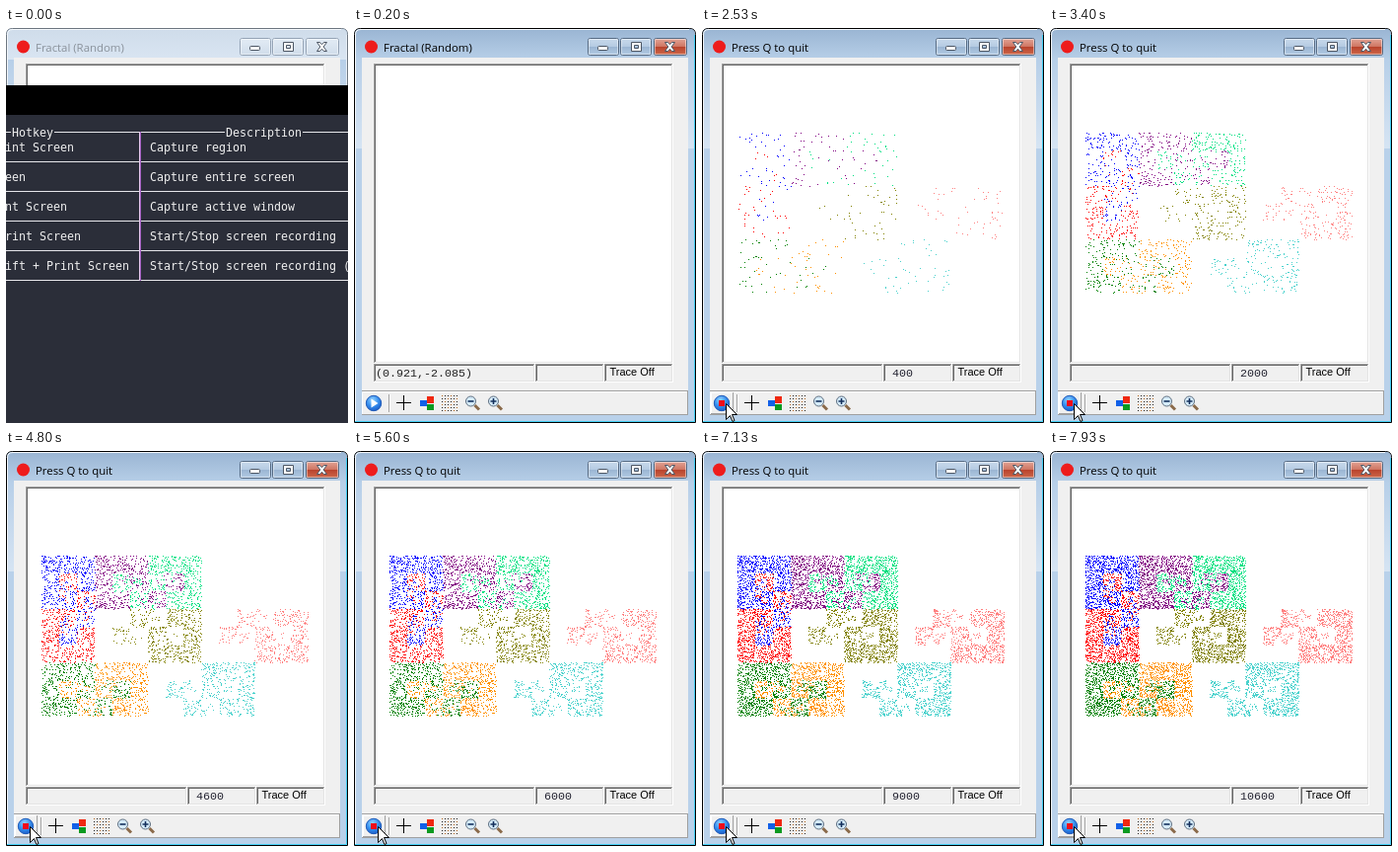
These frames come from a looping animation (347 by 400 pixels, 8000 ms). An HTML page with a canvas:

```html
<!DOCTYPE html>
<html lang="en">
<head>
<meta charset="utf-8">
<title>Random fractal</title>
<style>
html, body { margin: 0; width: 100%; height: 100%; overflow: hidden; background: #fff; }
svg, canvas { position: absolute; left: 0; top: 0; display: block; }
.title { font: 11.4px "Open Sans", "Noto Sans", sans-serif; }
.mono { font: 11.67px "Liberation Mono", monospace; }
.small { font: 11px "Liberation Sans", sans-serif; }
.term { font: 11.63px "DejaVu Sans Mono", monospace; fill: #f0f0f0; white-space: pre; }
.crisp { shape-rendering: crispEdges; }
</style>
</head>
<body>
<svg id="ui" width="347" height="400" viewBox="0 0 347 400">
  <defs>
    <linearGradient id="cap" x2="0" y2="1">
      <stop stop-color="#9ab5d3"/><stop offset="1" stop-color="#b7cfe8"/>
    </linearGradient>
    <linearGradient id="capOff" x2="0" y2="1">
      <stop stop-color="#cfdcea"/><stop offset="1" stop-color="#d9e5f2"/>
    </linearGradient>
    <linearGradient id="side" x2="0" y2="1">
      <stop stop-color="#b7cfe8"/><stop offset="1" stop-color="#d6e4f3"/>
    </linearGradient>
    <linearGradient id="btn" x2="0" y2="1">
      <stop stop-color="#c9daec"/><stop offset=".48" stop-color="#b5cbe2"/>
      <stop offset=".5" stop-color="#9ab5d2"/><stop offset="1" stop-color="#b3cbe4"/>
    </linearGradient>
    <linearGradient id="close" x2="0" y2="1">
      <stop stop-color="#e3a597"/><stop offset=".48" stop-color="#cf7663"/>
      <stop offset=".5" stop-color="#b9412b"/><stop offset="1" stop-color="#cd6a4c"/>
    </linearGradient>
    <linearGradient id="btnOff" x2="0" y2="1">
      <stop stop-color="#e3ecf5"/><stop offset="1" stop-color="#cfdcea"/>
    </linearGradient>
    <radialGradient id="ball" cx=".42" cy=".3" r=".75">
      <stop stop-color="#9ad6ff"/><stop offset=".5" stop-color="#3a92f0"/><stop offset="1" stop-color="#1456c4"/>
    </radialGradient>
  </defs>

  <!-- window frame -->
  <path id="frame" d="M.5 399.5V6.500Q.5.5 6.500.5H340.500Q346.500.5 346.500 6.500V399.500Z" fill="#b9d1ea"/>
  <path id="caption" d="M1 32V6.500Q1 1 6.500 1H340.500Q346 1 346 6.500V32Z" fill="url(#cap)"/>
  <rect x="1" y="32" width="345" height="90" fill="url(#side)"/>
  <path d="M1.500 398V7Q1.500 1.500 7 1.500H340" fill="none" stroke="#f4f8fc"/>
  <path id="glow" d="M1 398.500H345.500V7" fill="none"/>
  <circle cx="17.500" cy="19" r="6.500" fill="#ee1c1c"/>
  <text id="title" class="title" x="30" y="24"></text>
  <g id="buttons">
    <rect x="237.500" y="10.500" width="31" height="17" rx="2" fill="url(#btn)"/>
    <rect x="270.500" y="10.500" width="31" height="17" rx="2" fill="url(#btn)"/>
    <rect id="shut" x="304.500" y="10.500" width="33" height="17" rx="2" fill="url(#close)"/>
  </g>
  <path d="M238.500 11.500H267.500V26.500H238.500ZM271.500 11.500H300.500V26.500H271.500ZM305.500 11.500H336.500V26.500H305.500Z" fill="none" stroke="#fff" stroke-opacity=".45"/>
  <g fill="#fff" stroke="#4c5664">
    <rect x="247.500" y="18.500" width="10" height="4" rx="1"/>
    <path fill-rule="evenodd" d="M281.500 14.500H291.500V23.500H281.500ZM284.500 17.500V20.500H288.500V17.500Z"/>
    <path d="M315.500 14.500H318.500L320.500 16.700 322.500 14.500H325.500L322.200 19 325.500 23.500H322.500L320.500 21.200 318.500 23.500H315.500L318.800 19Z"/>
  </g>

  <!-- client area -->
  <g id="client" class="crisp">
    <rect x="8" y="30" width="331" height="362" fill="#f0f0f0"/>
    <rect x="20" y="36" width="304" height="304" fill="#fff"/>
    <path d="M8 367.500H339" stroke="#a0a0a0"/>
    <path d="M8.500 391V368.500H338" fill="none" stroke="#fff"/>
    <path d="M8 391.500H338.500V368" fill="none" stroke="#a0a0a0"/>
    <path d="M35.500 371V389" stroke="#a0a0a0"/>
    <path d="M36.500 371V389" stroke="#fff"/>
  </g>
  <text id="coords" class="mono" x="22" y="353" fill="#222"></text>
  <text id="count" class="mono" x="193" y="353" fill="#222230"></text>
  <text class="small" x="259.500" y="352">Trace Off</text>

  <!-- toolbar -->
  <g id="edge" class="crisp" fill="none">
    <path id="lit" d="M9.500 391V369.500H32" stroke="#fff"/>
    <path id="dim" d="M9 390.500H31.500V369" stroke="#a0a0a0"/>
  </g>
  <g id="run">
    <circle cx="20" cy="380" r="7.700" fill="url(#ball)" stroke="#1f5ab8"/>
    <path id="play" d="M17.500 375.500L24.500 380L17.500 384.500Z" fill="#fff"/>
    <rect id="stop" x="17" y="377" width="6" height="6" fill="#f00c18"/>
  </g>
  <g id="tools" class="crisp">
    <path d="M43 379.500H58M50.500 372V387" stroke="#000"/>
    <rect x="67" y="377" width="7" height="6" fill="#1260e8"/>
    <rect x="74" y="373" width="7" height="7" fill="#f02810"/>
    <rect x="74" y="381" width="7" height="6" fill="#0a9a20"/>
  </g>
  <g id="lenses" fill="#d5ebfa" stroke="#5f6f80"></g>
</svg>

<canvas id="plot" width="347" height="400"></canvas>

<svg id="top" width="347" height="400" viewBox="0 0 347 400">
  <path id="cursor" d="M.5.5V16.500L4.500 12.500L7 18.500L9 17.500L6.500 11.500H11.500Z" fill="#fff" stroke="#000"/>
  <g id="terminal">
    <rect y="58" width="347" height="30" fill="#000"/>
    <rect y="88" width="347" height="312" fill="#2b2e39"/>
    <path class="crisp" d="M0 105.500H5M49 105.500H222M301 105.500H347" stroke="#e6e6ea"/>
    <text class="term" x="6" y="110">Hotkey</text>
    <text class="term" x="223" y="110">Description</text>
  </g>
</svg>

<script>
const $ = id => document.getElementById(id);
const add = (parent, tag, attrs, text = "") => {
  const el = document.createElementNS("http://www.w3.org/2000/svg", tag);
  for (const name in attrs) el.setAttribute(name, attrs[name]);
  el.textContent = text;
  parent.append(el);
  return el;
};
const show = (id, on) => { $(id).style.display = on ? "" : "none"; };

// Two-pixel sunken borders: canvas and status panels
function sunken(x, y, w, h) {
  const line = (d, stroke) => add($("client"), "path", { d, stroke, fill: "none" });
  const r = x + w, b = y + h;
  line(`M${x} ${b - .5}H${r - .5}V${y}`, "#fff");
  line(`M${x + 1} ${b - 1.5}H${r - 1.5}V${y + 1}`, "#e3e3e3");
  line(`M${x + .5} ${b - 1}V${y + .5}H${r - 1}`, "#a0a0a0");
  line(`M${x + 1.5} ${b - 2}V${y + 1.5}H${r - 2}`, "#696969");
}
sunken(20, 36, 304, 304);
sunken(20, 340, 164, 19);
sunken(184, 340, 70, 19);
sunken(254, 340, 70, 19);

// Grid icon
for (let i = 0; i < 36; i++) {
  const col = i % 6, row = Math.floor(i / 6);
  add($("tools"), "rect", {
    x: 89 + col * 3, y: 372 + row * 3, width: 1, height: 1,
    fill: (col + row) % 3 ? "#222" : "#b5651d"
  });
}

// Magnifiers
for (const [x, sign] of [[118.5, "M-3 0H3"], [141.5, "M-3 0H3M0-3V3"]]) {
  const lens = add($("lenses"), "g", { transform: `translate(${x} 378)` });
  add(lens, "path", { d: "M4 4L8.500 8.500", stroke: "#8a6a4a", "stroke-width": 3 });
  add(lens, "circle", { r: 5 });
  add(lens, "path", { d: sign, stroke: "#14305c", "stroke-width": 1.6 });
}

// Terminal table
const rows = [
  [69, "+ Print Screen", "Capture region"],
  [20, "Print Screen", "Capture entire screen"],
  [62, "+ Print Screen", "Capture active window"],
  [76, "+ Print Screen", "Start/Stop screen recording"],
  [125, "Shift + Print Screen", "Start/Stop screen recording (GIF)"]
];
rows.forEach(([end, key, what], i) => {
  const y = 125 + i * 30, term = $("terminal");
  add(term, "text", { class: "term", x: end, y, "text-anchor": "end" }, key);
  add(term, "text", { class: "term", x: 146, y }, what);
  add(term, "path", { class: "crisp", d: `M0 ${y + 10.5}H347`, stroke: "#e6e6ea" });
});
add($("terminal"), "path", { class: "crisp", d: "M135.500 105V256", stroke: "#e6c8ee" });
add($("terminal"), "path", { class: "crisp", d: "M136.500 105V256", stroke: "#a35fc0" });

// Chaos game: colour, cell column and row, then a 2x2 orientation matrix
const maps = [
  ["#0000ff", 0, 0, 0, 1, 1, 0],
  ["#800080", 1, 0, 1, 0, 0, 1],
  ["#00e080", 2, 0, -1, 0, 0, 1],
  ["#ff0000", 0, 1, 0, 1, -1, 0],
  ["#808000", 2, 1, -1, 0, 0, -1],
  ["#ff8080", 4, 1, -1, 0, 0, -1],
  ["#008000", 0, 2, 1, 0, 0, 1],
  ["#ff9000", 1, 2, -1, 0, 0, 1],
  ["#48d1cc", 3, 2, -1, 0, 0, 1]
];
const CELL = 54.2, LEFT = 36, TOP = 106;
let seed = 20177;
const random = () => {
  seed = (seed + 0x6d2b79f5) | 0;
  let r = Math.imul(seed ^ (seed >>> 15), 1 | seed);
  r = (r + Math.imul(r ^ (r >>> 7), 61 | r)) ^ r;
  return ((r ^ (r >>> 14)) >>> 0) / 4294967296;
};
const points = [];
let x = 0.5, y = 0.5;
for (let i = -20; i < 10800; i++) {
  const [color, col, row, a, b, c, d] = maps[Math.floor(random() * maps.length)];
  const u = (x - 1.5) / 3, v = (y - 1.5) / 3;
  x = col + 0.5 + a * u + b * v;
  y = row + 0.5 + c * u + d * v;
  if (i >= 0) points.push([Math.floor(LEFT + x * CELL), Math.floor(TOP + y * CELL), color]);
}

const ctx = $("plot").getContext("2d");
let drawn = 0;
function plot(n) {
  if (n < drawn) {
    ctx.clearRect(0, 0, 347, 400);
    drawn = 0;
  }
  for (; drawn < n; drawn++) {
    const [px, py, color] = points[drawn];
    ctx.fillStyle = color;
    ctx.fillRect(px, py, 1, 1);
  }
}

// Tables are [step, ...values] at 15 steps per second
const pointer = [[6, 332, 166], [15, 18, 374], [23, 18, 374], [24, 12, 386], [28, 24, 380]];
const progress = [[35, 0], [51, 2000], [72, 4600], [96, 7600], [119, 10600]];
const ease = p => p * p * (3 - 2 * p);

function sample(table, k, curve = p => p) {
  if (k <= table[0][0]) return table[0].slice(1);
  for (let i = 1; i < table.length; i++) {
    const [k0, ...from] = table[i - 1], [k1, ...to] = table[i];
    if (k <= k1) {
      const p = curve((k - k0) / (k1 - k0));
      return from.map((f, j) => f + (to[j] - f) * p);
    }
  }
  return table[table.length - 1].slice(1);
}

function render(k) {
  const covered = k < 3, running = k >= 34, pressed = k >= 31 && !running;
  show("terminal", covered);
  $("caption").setAttribute("fill", covered ? "url(#capOff)" : "url(#cap)");
  $("frame").setAttribute("stroke", covered ? "#6d7680" : "#000");
  $("glow").setAttribute("stroke", covered ? "#e9f1f9" : "#45d0f5");
  $("buttons").setAttribute("stroke", covered ? "#94a3b5" : "#566b84");
  for (const b of $("buttons").children) {
    const active = b.id === "shut" ? "url(#close)" : "url(#btn)";
    b.setAttribute("fill", covered ? "url(#btnOff)" : active);
  }
  $("title").textContent = running ? "Press Q to quit" : "Fractal (Random)";
  $("title").setAttribute("fill", covered ? "#8a929b" : "#000");

  const [cx, cy] = sample(pointer, k, ease);
  show("cursor", k >= 4);
  $("cursor").setAttribute("transform", `translate(${Math.round(cx)} ${Math.round(cy)})`);
  const inside = cx < 323 && cy < 339;
  const at = k <= 6 ? [0.921, -2.085] : [(cx - LEFT) / CELL, (TOP - cy) / CELL];
  $("coords").textContent = k <= 6 || inside ? `(${at.map(n => n.toFixed(3)).join(",")})` : "";

  show("edge", k >= 15);
  $("lit").setAttribute("stroke", pressed ? "#a0a0a0" : "#fff");
  $("dim").setAttribute("stroke", pressed ? "#fff" : "#a0a0a0");
  $("run").setAttribute("transform", pressed ? "translate(1 1)" : "");
  show("play", !running);
  show("stop", running);

  const n = k > 35 ? Math.round(sample(progress, k)[0]) + 60 : 0;
  plot(n);
  $("count").textContent = n >= 200 ? Math.floor(n / 200) * 200 : "";
}

let last = -1;
function tick() {
  const t = performance.now() % 8000;
  const k = Math.min(119, Math.floor(t * 15 / 1000 + 0.06));
  if (k !== last) render(last = k);
  requestAnimationFrame(tick);
}
tick();
</script>
</body>
</html>
```
